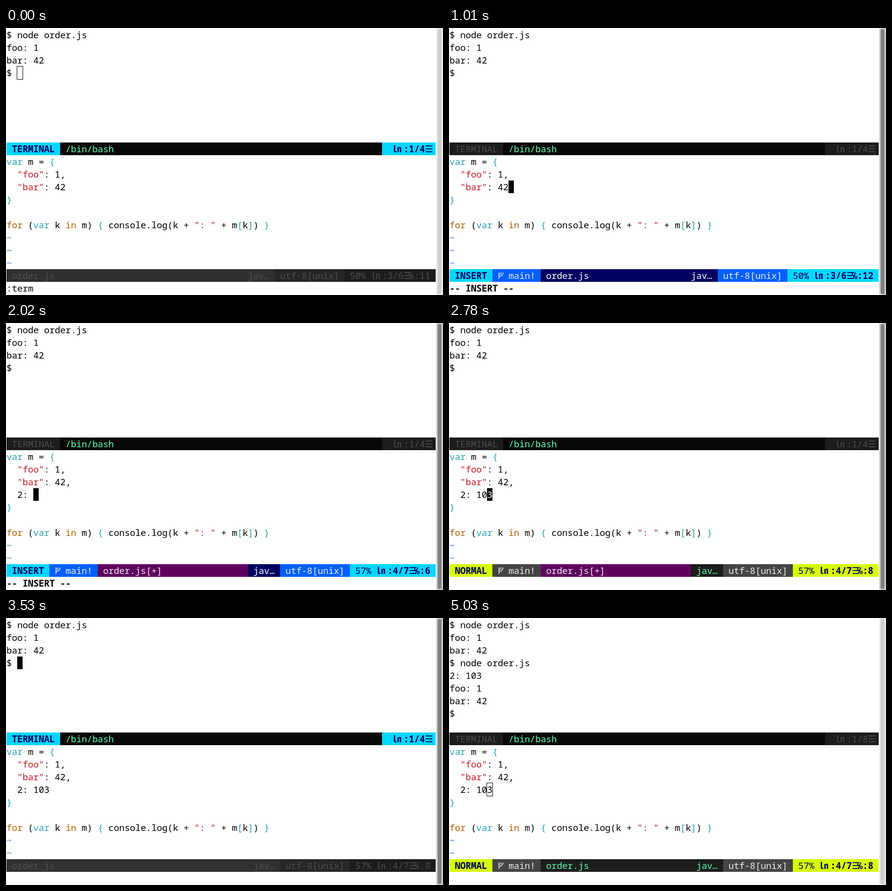
Recreate the animation shown at these times as an HTML page. Size 896 px wide and 548 px high, loop 5.28 s.

```html
<!DOCTYPE html>
<html lang="en">
<head>
<meta charset="utf-8">
<title>Key order</title>
<style>
  html, body { margin: 0; width: 100%; height: 100%; overflow: hidden; background: #fff; }
  svg { display: block; width: 896px; height: 548px; }
  text {
    font: 18.667px "Noto Sans Mono", "Noto Sans CJK JP", "DejaVu Sans", monospace;
    letter-spacing: -0.2px;
    white-space: pre;
  }
  .bold { font-weight: 700; }
</style>
</head>
<body>
<svg id="stage" viewBox="0 0 896 548"></svg>
<script>
const LOOP = 5280, CELL = 11, LINE = 26, COLS = 80;
const TEAL = '#2aa1b3', RED = '#c01c28', BROWN = '#af5f00', BLUE = '#2a7bde';
const NAVY = '#00005f', MINT = '#5fffaf', DIM = '#4e4e4e', PALE = '#eeeeee';

// a: mode and position, b: branch and encoding, c: file; each [text, background]
const THEMES = {
  NORMAL: { a: [NAVY, '#d7ff00'], b: [PALE, '#444444'], c: [MINT, '#1c1c1c'] },
  INSERT: { a: [NAVY, '#00d7ff'], b: [PALE, '#005fff'], c: ['#ffffff', NAVY] },
  COMMAND: { a: [NAVY, '#00d700'], b: [PALE, '#444444'], c: [MINT, '#1c1c1c'] },
  idle: { a: [DIM, '#1c1c1c'], b: [DIM, '#262626'], c: [DIM, '#303030'] }
};

const RUN = ['$ node order.js', 'foo: 1', 'bar: 42'];
const RERUN = [...RUN, RUN[0], '2: 103', ...RUN.slice(1)];

// Each step changes only what differs from the step before it.
const STEPS = [
  { at: 0, shell: [...RUN, '$ '], count: 4, pane: 'shell', cursor: [2, 3], focused: false,
    active: false, comma: '', entry: null, dirty: false, line: 3, col: 11, command: ':term' },
  { at: 250, focused: true },
  { at: 510, active: true },
  { at: 760, pane: 'NORMAL', cursor: [10, 12] },
  { at: 1010, pane: 'INSERT', cursor: [11, 12], col: 12, command: '-- INSERT --' },
  { at: 1260, comma: ',', dirty: true, cursor: [12, 12], col: 13 },
  { at: 1520, entry: '  ', line: 4, cursor: [2, 13], col: 3 },
  { at: 1770, entry: '  2', cursor: [3, 13], col: 4 },
  { at: 2020, entry: '  2: ', cursor: [5, 13], col: 6 },
  { at: 2270, entry: '  2: 10', cursor: [7, 13], col: 8 },
  { at: 2530, entry: '  2: 103', cursor: [8, 13], col: 9 },
  { at: 2780, pane: 'NORMAL', cursor: [7, 13], col: 8, command: '' },
  { at: 3030, pane: 'COMMAND', cursor: [2, 20], command: ':w' },
  { at: 3280, pane: 'NORMAL', cursor: [7, 13], dirty: false, command: '"order.js" 7L, 97B written' },
  { at: 3530, pane: 'shell', cursor: [2, 3], command: '' },
  { at: 3780, shell: RERUN.slice(0, 4), cursor: [15, 3] },
  { at: 4030, shell: [...RERUN, '$ '], count: 8, cursor: [2, 7] },
  { at: 4280, pane: 'NORMAL', cursor: [7, 13] },
  { at: 4530, focused: false },
  { at: 4780, active: false }
];
const states = [];
STEPS.forEach((step, i) => states.push({ ...states[i - 1], ...step }));

const colX = col => 1 + col * CELL;
const rowY = row => 1 + row * LINE;
const escapeText = s => s.replace(/&/g, '&amp;').replace(/</g, '&lt;');

function text(col, row, string, fill = '#000', bold = false) {
  return `<text x="${colX(col)}" y="${rowY(row) + 20}" fill="${fill}"` +
    `${bold ? ' class="bold"' : ''}>${escapeText(string)}</text>`;
}

function block(from, to, row, fill) {
  return `<rect x="${colX(from)}" y="${rowY(row)}" width="${(to - from) * CELL}" height="${LINE}" fill="${fill}"/>`;
}

function code(row, string) {
  const token = /("[^"]*")|\b(var)\b|\b(for|in)\b|([{}[\]])|(~)/g;
  const colors = [RED, TEAL, BROWN, TEAL, BLUE];
  let out = '', last = 0;
  for (const match of string.matchAll(token)) {
    out += text(last, row, string.slice(last, match.index));
    out += text(match.index, row, match[0], colors[match.slice(1).findIndex(Boolean)]);
    last = match.index + match[0].length;
  }
  return out + text(last, row, string.slice(last));
}

// Line number sign takes two cells, the bars overhang their single cell.
function lineNumber(col, row, value, fill, bold) {
  const bars = col + 3 + value.length;
  return text(col, row, '㏑', fill, bold) + text(col + 2, row, ':' + value, fill, bold) +
    text(bars, row, '☰', fill, bold);
}

function branchMark(col, fill) {
  return `<path d="M${colX(col) + 2.5} 501.5v13.5m0-4.5q7-1 8.5-8.5m-8.5 4q4-.5 4.5-4.5" ` +
    `fill="none" stroke="${fill}" stroke-width="1.5"/>`;
}

function shellStatus(s) {
  const on = s.pane === 'shell';
  const [ink, fill] = THEMES[on ? 'INSERT' : 'idle'].a;
  return block(0, 10, 9, fill) + block(10, 70, 9, '#080808') + block(70, COLS, 9, fill) +
    text(1, 9, 'TERMINAL', ink, on) + text(11, 9, '/bin/bash', MINT) +
    lineNumber(72, 9, '1/' + s.count, ink, on);
}

function fileStatus(s) {
  const row = 19, on = s.pane !== 'shell';
  const { a, b, c } = THEMES[on ? s.pane : 'idle'];
  const total = s.entry === null ? 6 : 7;
  const place = 65 - String(s.col).length;
  const encoding = place - 12, type = encoding - 6;
  const dirty = on && s.dirty;
  let out = block(0, COLS, row, c[1]), file = 1;
  if (on) {
    const branch = s.pane.length + 2;
    file = branch + 10;
    out += block(0, branch, row, a[1]) + text(1, row, s.pane, a[0], true) +
      block(branch, branch + 9, row, b[1]) + branchMark(branch + 1, b[0]) +
      text(branch + 3, row, 'main!', b[0]);
    if (dirty) out += block(branch + 9, type - 1, row, '#5f005f');
  }
  return out +
    text(file, row, 'order.js' + (dirty ? '[+]' : ''), dirty ? PALE : c[0]) +
    text(type, row, 'jav…', c[0]) +
    block(encoding - 1, place, row, b[1]) + text(encoding, row, 'utf-8[unix]', b[0]) +
    block(place, COLS, row, a[1]) +
    text(place + 1, row, Math.floor(s.line / total * 100) + '%', a[0]) +
    lineNumber(place + 5, row, s.line + '/' + total, a[0], on) +
    text(place + 12, row, '℅', a[0], on) + text(place + 13, row, ':' + s.col, a[0], on);
}

function cursor(s) {
  const [col, row] = s.cursor;
  if (!s.focused) {
    return `<rect x="${colX(col) - 0.5}" y="${rowY(row) - 0.5}" width="12" height="27" fill="none" stroke="#000"/>`;
  }
  const under = s.pane !== 'NORMAL' ? '' : s.entry === null ? '2' : '3';
  return block(col, col + 1, row, '#000') + text(col, row, under, '#fff');
}

function scrollbar(active) {
  const [track, thumb] = active ? ['#cecfce', '#7e8180'] : ['#ebebeb', '#cecece'];
  return `<rect x="882" width="14" height="548" fill="${track}"/>` +
    `<rect x="885" y="2" width="8" height="544" rx="4" fill="${thumb}"/>`;
}

function picture(s) {
  const source = ['var m = {', '  "foo": 1,', '  "bar": 42' + s.comma];
  if (s.entry !== null) source.push(s.entry);
  source.push('}', '', 'for (var k in m) { console.log(k + ": " + m[k]) }');
  while (source.length < 9) source.push('~');
  return s.shell.map((string, row) => text(0, row, string)).join('') +
    source.map((string, i) => code(10 + i, string)).join('') +
    shellStatus(s) + fileStatus(s) +
    text(0, 20, s.command, '#000', s.pane === 'INSERT') +
    cursor(s) + scrollbar(s.active);
}

const stage = document.getElementById('stage');
let shown = null;

function update(time) {
  const t = time % LOOP;
  const state = states.filter(s => s.at <= t).pop();
  if (state !== shown) stage.innerHTML = picture(shown = state);
}

const start = performance.now();
function tick() {
  update(performance.now() - start);
  requestAnimationFrame(tick);
}
tick();
</script>
</body>
</html>
```
